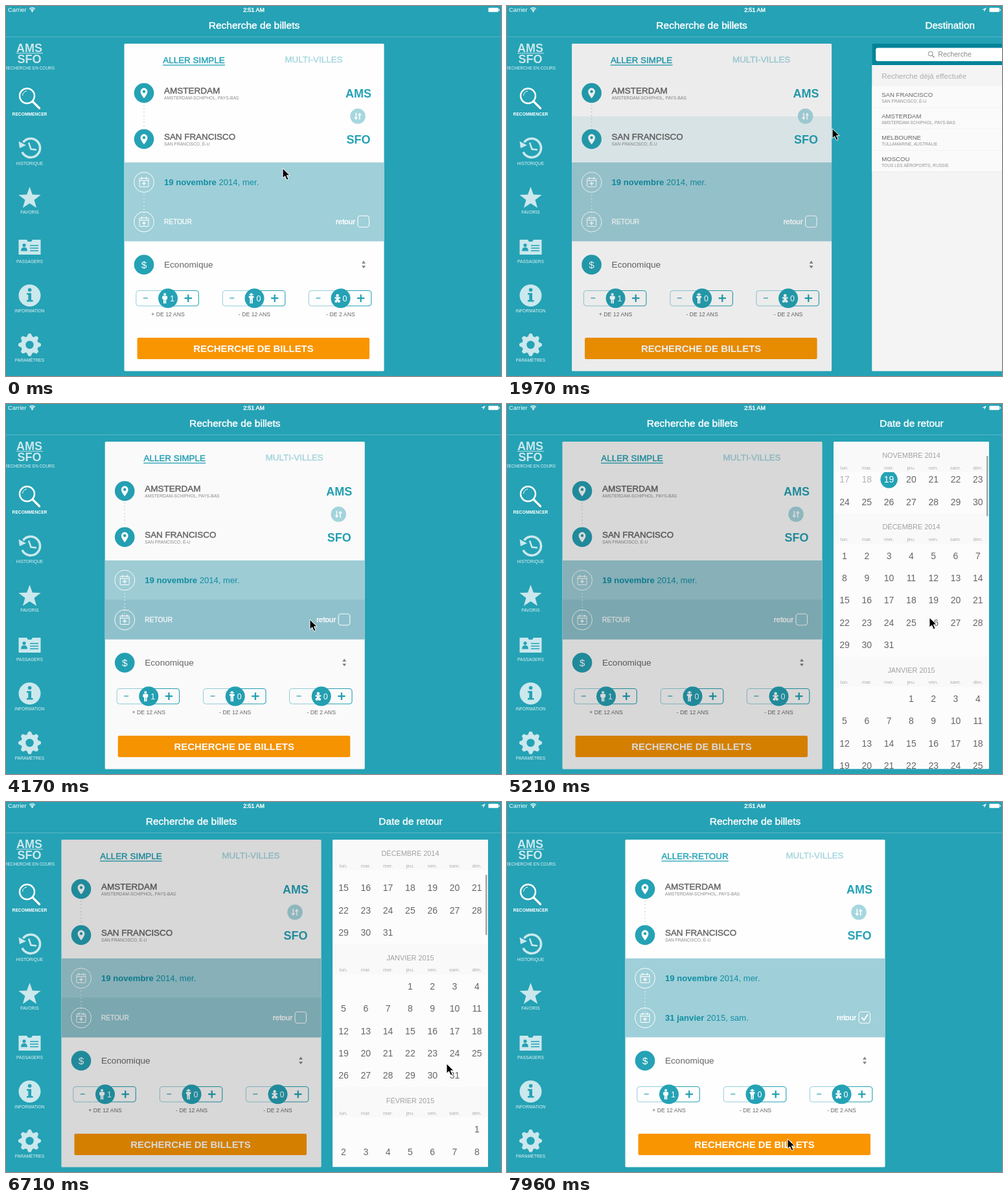
An HTML page for the animation above (8000 ms loop, 764 by 570 pixels).

```html
<!DOCTYPE html>
<html lang="fr">
<head>
<meta charset="utf-8">
<title>Recherche de billets</title>
<style>
  html, body { margin: 0; width: 100%; height: 100%; overflow: hidden; background: #25a2b5; }
  svg { display: block; width: 764px; height: 570px; font-family: "Liberation Sans", Arial, sans-serif; }
</style>
</head>
<body>
<svg id="stage" viewBox="0 0 764 570"></svg>
<script>
const LOOP = 8000;
const TEAL = '#25a2b5', PALE = '#a6d7df', SIDE = '#cbe8ed', GREY = '#666', DARK = '#118fa3';

// Markup helpers
const text = (x, y, str, size, fill, { anchor = 'start', bold = false, medium = false, id = '' } = {}) =>
  `<text ${id && `id="${id}"`} x="${x}" y="${y}" font-size="${size}" fill="${fill}" text-anchor="${anchor}"` +
  `${bold ? ' font-weight="700"' : ''}${medium ? ` stroke="${fill}" stroke-width=".45"` : ''}>${str}</text>`;
const mid = (x, y, str, size, fill, opts = {}) => text(x, y, str, size, fill, { anchor: 'middle', ...opts });
const rect = (x, y, w, h, fill, extra = '') => `<rect x="${x}" y="${y}" width="${w}" height="${h}" fill="${fill}" ${extra}/>`;
const circle = (x, y, r, fill, extra = '') => `<circle cx="${x}" cy="${y}" r="${r}" fill="${fill}" ${extra}/>`;
const path = (d, fill, extra = '') => `<path d="${d}" fill="${fill}" ${extra}/>`;
const line = (d, color, width, extra = '') => path(d, 'none', `stroke="${color}" stroke-width="${width}" ${extra}`);
const group = (id, body, extra = '') => `<g id="${id}" ${extra}>${body}</g>`;
const at = (x, y, body) => `<g transform="translate(${x} ${y})">${body}</g>`;

const polar = (count, radius, phase = 0) => Array.from({ length: count }, (_, i) => {
  const a = (i + phase) / count * 2 * Math.PI - Math.PI / 2, r = radius(i);
  return `${(r * Math.cos(a)).toFixed(2)},${(r * Math.sin(a)).toFixed(2)}`;
}).join('L');

function statusBar() {
  const arcs = [2, 4.2, 6.4].map(r =>
    `M${40.5 - r * .7} ${9 - r * .75}Q40.5 ${9 - r * 1.25} ${40.5 + r * .7} ${9 - r * .75}`).join('');
  return text(3, 9, 'Carrier', 9.4, '#fff') + line(arcs, '#fff', 1.3) + circle(40.5, 8.4, 1, '#fff') +
    mid(382.5, 9, '2:51 AM', 8.9, '#fff', { medium: true }) +
    path('M740 2.5L733 5.8H736.6V9.2Z', '#fff', 'id="locate"') +
    rect(744.5, 2.8, 15.5, 6.4, '#fff', 'rx="1"') + rect(760.6, 4.6, 1.4, 2.8, '#fff') +
    rect(0, 47, 764, 1, '#56b7c6');
}

function sidebar() {
  const label = (y, str, bold) => mid(36.5, y, str, 6.7, bold ? '#fff' : '#e2f3f6', { bold });
  const gear = 'M' + polar(32, i => i % 4 < 2 ? 17 : 13, -.5) + 'Z';
  return mid(36, 71, 'AMS', 18, SIDE, { bold: true }) + rect(16, 72.3, 41, 1, SIDE) +
    mid(36, 88, 'SFO', 18, SIDE, { bold: true }) + mid(36.5, 98, 'RECHERCHE EN COURS', 6.5, '#e2f3f6') +
    line('M43 149L52 158.5', '#1b8496', 4) + circle(32.5, 138.5, 11.5, 'none', 'stroke="#fff" stroke-width="2.4"') +
    line('M25.5 138A7.5 7.5 0 0 1 32 131', '#fff', 1) + line('M41 147L51.5 157.5', '#fff', 3.4, 'stroke-linecap="round"') +
    label(168.7, 'RECOMMENCER', true) +
    line('M26.5 210A14.5 14.5 0 1 1 25 225', SIDE, 3.6) + path('M19.5 208.5L21 219L31 214.5Z', SIDE) +
    line('M35 210.5L38.5 220.5L47 221.5', SIDE, 2.5) + label(244.6, 'HISTORIQUE') +
    at(36.5, 296.5, path('M' + polar(10, i => i % 2 ? 7.4 : 18) + 'Z', SIDE)) + label(320.2, 'FAVORIS') +
    path('M19.5 360H32L34 363H39L41 360H53.5V383H19.5Z', SIDE) + circle(28, 368.5, 2.6, TEAL) +
    path('M23 377.5Q23 371.8 28 371.8T33 377.5Z', TEAL) +
    line('M37 369H50M37 373H50M37 377H50', TEAL, 1.7) + label(396, 'PASSAGERS') +
    circle(36.5, 446, 17, SIDE) + circle(36.6, 437.2, 2.8, TEAL) +
    path('M32 442.3H39V453H41.5V455.5H32V453H34.3V444.8H32Z', TEAL) + label(471.8, 'INFORMATION') +
    at(36.5, 522, path(gear, SIDE, `stroke="${SIDE}" stroke-linejoin="round"`) + circle(0, 0, 6.2, TEAL)) +
    label(547.6, 'PARAMÈTRES');
}

const pin = y => circle(213, y, 15.3, TEAL) +
  path(`M213 ${y + 8.3}Q207.6 ${y + 1.5} 207.6 ${y - 2.3}A5.4 5.4 0 0 1 218.4 ${y - 2.3}Q218.4 ${y + 1.5} 213 ${y + 8.3}Z`, '#fff') +
  circle(213, y - 2.2, 2.2, TEAL);

const dateIcon = y => circle(213, y, 15.5, 'none', 'stroke="#fff" stroke-width="1"') +
  at(213, y, rect(-7, -6, 14, 13, 'none', 'stroke="#fff" rx="1"') + line('M-7 -2.6H7', '#fff', 1.2) +
    line('M-3.5 -8V-4.5M3.5 -8V-4.5', '#fff', 1.3) + line('M-3 2H3M0 -1V5', '#fff', 1.3));

const dots = (y, color) => line(`M213 ${y}v34`, color, 1.3, 'stroke-dasharray="1.5 3.8"');

// 0 adult, 1 child, 2 baby
const person = kind => {
  const legs = kind < 2 ? rect(-2.2, 1, 1.9, 7, '#fff') + rect(.3, 1, 1.9, 7, '#fff')
    : circle(-2.2, 4.6, 2.1, '#fff') + circle(2.2, 4.6, 2.1, '#fff');
  const body = kind < 2 ? rect(-4, -3.8, 8, 5.4 - kind * 2, '#fff', 'rx="1.6"') + rect(-2.2, -3, 4.4, 5, '#fff')
    : rect(-4.5, -1.8, 9, 2.2, '#fff', 'rx="1"') + rect(-2, -1, 4, 5, '#fff');
  return circle(0, kind < 2 ? -6.1 : -4.2, kind < 2 ? 1.9 : 2.3, '#fff') + body + legs +
    (kind === 1 ? rect(-3.4, -6.4, 6.8, 1, '#fff') : '');
};

const stepper = (x, kind, label) => at(x, 0,
  line('M49 438.5H4.5a4 4 0 0 0-4 4V458a4 4 0 0 0 4 4H49', '#94ceda', 1) +
  line('M49 438.5H93a4 4 0 0 1 4 4V458a4 4 0 0 1-4 4H49', TEAL, 1.1) +
  rect(11.5, 449, 7, 2, '#7dc4d1') + line('M75.2 450.2h11.4M80.9 444.5v11.4', TEAL, 2.3) +
  circle(49.7, 450.3, 15, TEAL) + at(44.8, 450.3, person(kind)) +
  mid(56.2, 454.8, kind ? 0 : 1, 12.5, '#fff') + mid(49.7, 478, label, 8.7, '#666'));

function mainPanel() {
  const date = (y, bold, rest, id) => `<text id="${id}" x="244" y="${y}" font-size="13.1" fill="${DARK}">` +
    `<tspan font-weight="700">${bold}</tspan> ${rest}</text>`;
  return rect(182.5, 58, 401, 504.5, '#fefefe', 'rx="1.5"') +
    mid(290, 87.5, 'ALLER SIMPLE', 13.4, TEAL, { medium: true, id: 'tab' }) +
    rect(242, 90.4, 96, 1.3, TEAL, 'id="underline"') + mid(475, 87, 'MULTI-VILLES', 13.4, PALE, { medium: true }) +
    rect(182.5, 170, 401, 71, '#e8f4f6', 'id="toRow"') +
    dots(152, '#c4cdd0') + pin(134) + pin(205) +
    text(244, 135, 'AMSTERDAM', 13.5, GREY, { medium: true }) + text(244, 144.2, 'AMSTERDAM-SCHIPHOL, PAYS-BAS', 6.7, '#8b8b8b') +
    text(244, 206, 'SAN FRANCISCO', 13.4, GREY, { medium: true }) + text(244, 215.2, 'SAN FRANCISCO, É-U', 6.7, '#8b8b8b') +
    mid(544, 140.8, 'AMS', 18, TEAL, { bold: true }) + mid(544, 211.8, 'SFO', 18, TEAL, { bold: true }) +
    circle(543, 169.8, 11.8, PALE) + line('M540.3 164.5V174M545.7 166V175', '#fff', 1.6) +
    path('M537.3 171.5h6l-3 4zM542.7 168.5h6l-3 -4z', '#fff') +
    rect(182.5, 241, 401, 121.5, '#9fcfd8') + rect(182.5, 301.5, 401, 61, '#91c4cf', 'id="backRow"') +
    dots(291, '#e6f3f5') + dateIcon(271.5) + dateIcon(332.5) +
    date(276.3, '19 novembre', '2014, mer.', 'goDate') + date(337.3, '31 janvier', '2015, sam.', 'backDate') +
    text(244, 336, 'RETOUR', 10.2, '#f2f9fa', { medium: true, id: 'noDate' }) +
    text(539, 336, 'retour', 11.5, '#fff', { anchor: 'end', medium: true }) +
    rect(543, 323.3, 17.5, 17.5, 'none', 'rx="4" stroke="#fff" stroke-width="1.1"') +
    line('M547.3 332L551 336L557 327', '#fff', 2, 'id="check"') +
    circle(213, 398.5, 15.3, TEAL) + mid(213, 404, '$', 15.5, '#fff') +
    text(244, 403.3, 'Economique', 13.6, GREY) + path('M549 396.7h6l-3 -4.4zM549 399.9h6l-3 4.4z', '#888') +
    stepper(200.3, 0, '+ DE 12 ANS') + stepper(333.8, 1, '- DE 12 ANS') + stepper(466.8, 2, '- DE 2 ANS') +
    rect(202.5, 511, 358.5, 33, '#f99500', 'rx="2"') + mid(382, 533, 'RECHERCHE DE BILLETS', 14.9, '#fff', { bold: true }) +
    rect(182.5, 58, 401, 504.5, '#000', 'id="shade" rx="1.5"');
}

const PLACES = [['SAN FRANCISCO', 'SAN FRANCISCO, É-U'], ['AMSTERDAM', 'AMSTERDAM-SCHIPHOL, PAYS-BAS'],
  ['MELBOURNE', 'TULLAMARINE, AUSTRALIE'], ['MOSCOU', 'TOUS LES AÉROPORTS, RUSSIE']];

function placesPanel() {
  const rows = PLACES.map(([name, sub], i) => at(0, 33 * i,
    rect(504, 123.5, 240, 33, '#fafafa', i ? '' : 'id="pick"') + rect(504, 156.5, 240, .8, '#e2e6e7') +
    text(519, 140.3, name, 9.6, GREY) + text(519, 148.6, sub, 6.6, '#909090'))).join('');
  return mid(624.5, 35, 'Destination', 15.3, '#fff', { medium: true }) +
    rect(504, 58, 240, 504.5, '#f4f4f4', 'rx="1.5"') + rect(504, 58, 240, 33, '#028498') +
    rect(510, 64.5, 228, 20.5, '#fff', 'rx="3"') + circle(594.5, 73.5, 3.5, 'none', 'stroke="#888"') +
    line('M597 76L600.5 79.5', '#888', 1.2) + text(606, 78.3, 'Recherche', 10.7, '#8a8a8a') +
    text(519, 112, 'Recherche déjà effectuée', 11.5, '#adadad') + rows;
}

// name, first column, first day, last day
const MONTHS = [['NOVEMBRE 2014', 0, 17, 30], ['DÉCEMBRE 2014', 0, 1, 31], ['JANVIER 2015', 3, 1, 31], ['FÉVRIER 2015', 6, 1, 28]];
const DAYS = ['lun.', 'mar.', 'mer.', 'jeu.', 'ven.', 'sam.', 'dim.'];
const ROW = 34.25, HEAD = 49, TOP = 79;
const colX = c => 521 + 34.3 * c;
const tops = [TOP];
MONTHS.forEach(([, col, a, b], i) => tops.push(tops[i] + HEAD + ROW * Math.ceil((col + b - a + 1) / 7)));

function calendarPanel() {
  let days = '', heads = '';
  MONTHS.forEach(([name, col, first, last], m) => {
    for (let d = first; d <= last; d++) {
      const cell = col + d - first, x = colX(cell % 7), y = tops[m] + 44.3 + ROW * Math.floor(cell / 7);
      const today = m === 0 && d === 19, chosen = m === 2 && d === 31;
      if (today) days += circle(x, y, 13.2, TEAL);
      if (chosen) days += circle(x, y, 13.2, TEAL, 'id="chosen"');
      days += mid(x, y + 5, d, 14, today ? '#fff' : m === 0 && d < 19 ? '#b4b4b4' : GREY, { id: chosen ? 'chosenDay' : '' });
    }
    heads += group('head' + m, rect(504, -21, 240, 47, '#f9f9f9') + mid(624, 4, name, 10.9, '#a0a0a0') +
      DAYS.map((d, c) => mid(colX(c), 21.5, d, 7.8, '#adadad')).join(''));
  });
  return mid(624.5, 35, 'Date de retour', 15.4, '#fff', { medium: true }) +
    `<g clip-path="url(#sheet)">` + rect(504, 58, 240, 504.5, '#fcfcfc') + group('days', days) + heads +
    rect(740, 0, 2.5, 93, '#a5a5a5', 'id="bar" rx="1.2"') + '</g>';
}

const stage = document.getElementById('stage');
stage.innerHTML = '<clipPath id="sheet"><rect x="504" y="58" width="240" height="504.5" rx="1.5"/></clipPath>' +
  rect(0, 0, 764, 570, TEAL) + statusBar() + sidebar() +
  group('main', mid(383, 35, 'Recherche de billets', 15.5, '#fff', { medium: true }) + mainPanel()) +
  group('places', placesPanel()) + group('calendar', calendarPanel()) +
  group('cursor', path('M0 0V15.2L3.6 11.9L6.3 18L9 16.8L6.4 10.9H11.2Z', '#000', 'stroke="#fff" stroke-width="1"'));

const el = {};
stage.querySelectorAll('[id]').forEach(n => el[n.id] = n);

const clamp = v => Math.max(0, Math.min(1, v));
const easeOut = v => 1 - (1 - clamp(v)) ** 3;
const smooth = v => v * v * (3 - 2 * v);
const show = (node, on) => node.setAttribute('visibility', on ? 'inherit' : 'hidden');
const move = (node, x, y) => node.setAttribute('transform', `translate(${x} ${y})`);

// time, x, y
const POINTER = [[0, 427, 250], [290, 427, 250], [630, 432, 215], [1700, 432, 215], [2330, 609, 149], [2870, 609, 149],
  [3500, 365, 319], [3580, 365, 319], [3760, 396, 327], [4100, 396, 327], [4120, 469, 332], [4960, 469, 332],
  [5140, 652, 336], [5210, 652, 329], [5740, 664, 190], [5830, 664, 190], [6620, 680, 403], [7050, 680, 403],
  [7780, 450, 506], [7870, 450, 506], [7950, 433, 519], [LOOP, 433, 519]];

function pointerAt(t) {
  const i = POINTER.findIndex(k => k[0] > t), a = POINTER[i - 1], b = POINTER[i];
  const v = smooth((t - a[0]) / (b[0] - a[0]));
  return [a[1] + (b[1] - a[1]) * v, a[2] + (b[2] - a[2]) * v];
}

// The sheet follows the drag, then glides on
function scrollAt(t) {
  if (t < 5140) return 0;
  return 336 - pointerAt(Math.min(t, 5740))[1] + 31 * easeOut((t - 5830) / 600);
}

// Side panel opens and closes twice
function openAt(t, ease) {
  const ramp = start => ease((t - start) / 600);
  return ramp(1690) - ramp(2838) + ramp(4102) - ramp(7060);
}

function render(t) {
  const open = openAt(t, easeOut), shift = 394 * (1 - open), booked = t >= 7040, picked = t >= 6800;
  move(el.main, -97 * open, 0);
  move(el.places, shift, 0);
  move(el.calendar, shift, 0);
  show(el.places, open > 0 && t < 3900);
  show(el.calendar, open > 0 && t >= 3900);
  el.shade.setAttribute('opacity', .15 * openAt(t, clamp));

  show(el.locate, t >= 1700);
  show(el.toRow, t >= 1640 && t < 3420);
  show(el.backRow, t >= 4110 && t < 7640);
  el.pick.setAttribute('fill', t >= 2750 ? '#d9edf1' : '#fafafa');

  el.tab.textContent = booked ? 'ALLER-RETOUR' : 'ALLER SIMPLE';
  el.underline.setAttribute('x', booked ? 238.5 : 242);
  el.underline.setAttribute('width', booked ? 103.5 : 96);
  show(el.backDate, booked);
  show(el.check, booked);
  show(el.noDate, !booked);

  const s = scrollAt(t);
  move(el.days, 0, -s);
  MONTHS.forEach((_, m) => move(el['head' + m], 0, Math.min(Math.max(TOP, tops[m] - s), tops[m + 1] - s - 47)));
  el.bar.setAttribute('y', 78.7 + .188 * s);
  show(el.bar, t >= 5100 && t < 6800);
  show(el.chosen, picked);
  el.chosenDay.setAttribute('fill', picked ? '#fff' : GREY);

  move(el.cursor, ...pointerAt(t));
}

function tick() {
  render(performance.now() % LOOP);
  requestAnimationFrame(tick);
}
tick();
</script>
</body>
</html>
```
